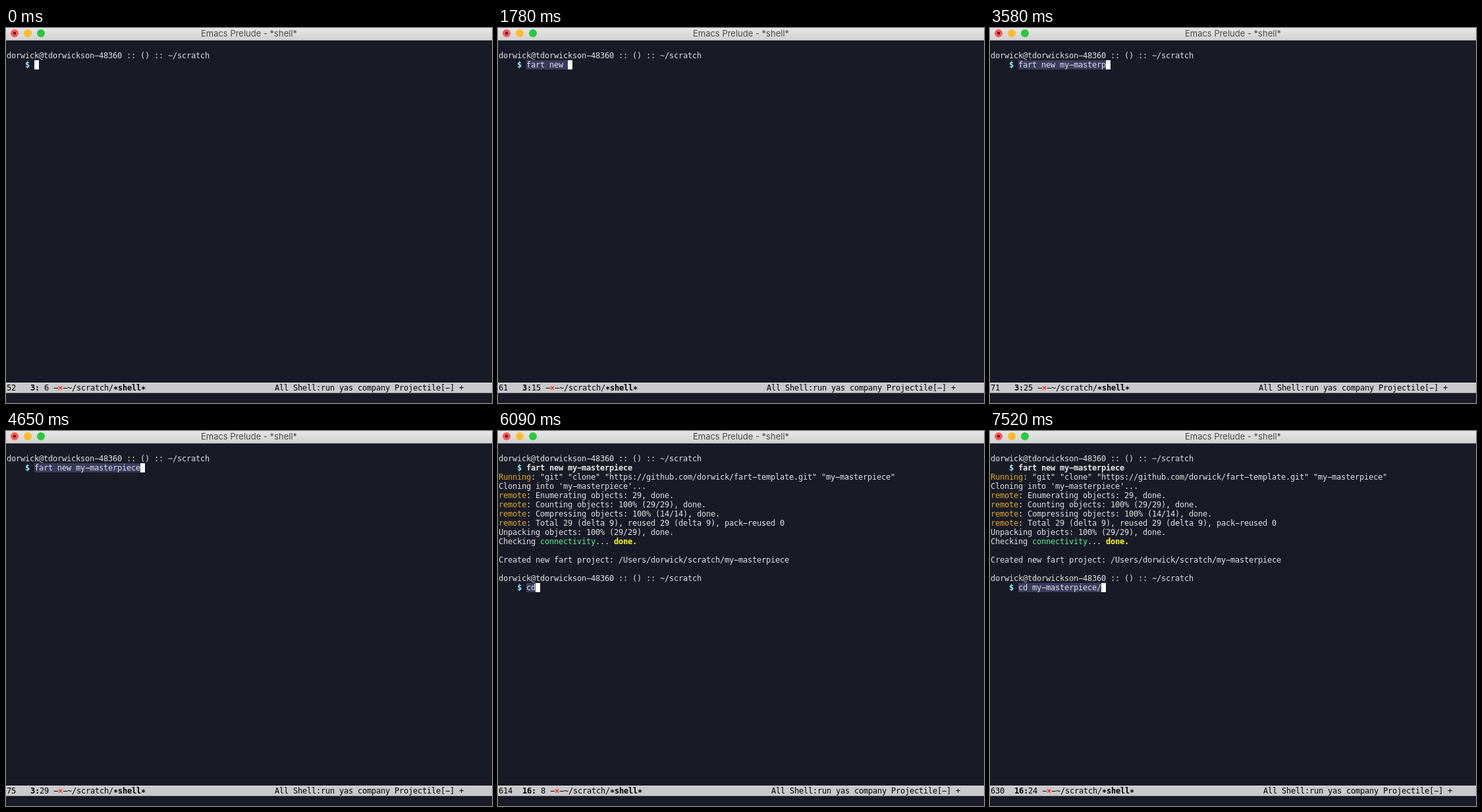
An HTML page with a canvas for the animation above (8000 ms loop, 738 by 570 pixels).

```html
<!DOCTYPE html>
<html lang="en">
<head>
<meta charset="utf-8">
<title>Shell session</title>
<style>
  html, body { margin: 0; width: 100%; height: 100%; overflow: hidden; background: #181a26; }
  canvas { display: block; }
</style>
</head>
<body>
<canvas id="stage" width="738" height="570"></canvas>
<script>
const ctx = document.getElementById('stage').getContext('2d');
const LOOP = 8000, CELL = 7, ROW = 14, LEFT = 1, TOP = 21;
const MONO = '12px "DejaVu Sans Mono", monospace';

// Markup: "<x>" switches to style x; [colour, bold, background]
const STYLES = {
  w: ['#e2e2e0'],
  b: ['#e8e8e6', true],
  h: ['#e2e2e0', false, '#3a3b5c'],
  p: ['#93f0fc', true],
  c: ['#a2f2fc'],
  o: ['#e2ab22'],
  g: ['#57f09a'],
  y: ['#ffff1a', true],
  k: ['#000'],
  K: ['#000', true],
  r: ['#ff2a12', true],
};
// Wide hyphens and centred asterisks
const GLYPHS = { '-': '\u2212', '*': '\u2217' };

const HOST = 'dorwick@tdorwickson-48360 :: () :: ~/scratch';
const PROMPT = '<p>    $ ';
const NEW = 'fart new my-masterpiece';
const CD = 'cd my-masterpiece/';
const PAD = ' '.repeat(8);

const remote = text => '<o>remote<w>: ' + text + PAD;
const START = [
  '<o>Running<w>: "git" "clone" "https://github.com/dorwick/fart-template.git" "my-masterpiece"',
  "Cloning into 'my-masterpiece'...",
];
const FETCH = [
  remote('Enumerating objects: 29, done.'),
  remote('Counting objects: 100% (29/29), done.'),
  remote('Compressing objects: 100% (14/14), done.'),
  remote('Total 29 (delta 9), reused 29 (delta 9), pack-reused 0'),
];
const FINISH = [
  'Unpacking objects: 100% (29/29), done.',
  'Checking <g>connectivity<w>... <y>done.',
  '',
  'Created new fart project: /Users/dorwick/scratch/my-masterpiece',
  '',
  HOST,
];

// One time per keystroke
const NEW_KEYS = [480, 960, 1080, 1190, 1300, 1540, 1660, 1780, 1780, 1900, 2020, 2260,
  2620, 2740, 2860, 2980, 3100, 3220, 3580, 4060, 4300, 4530, 4650];
const CD_KEYS = [6090, 6090, 6330, 6450, 6690, 6930, 7160, 7280, 7400];
const ENTER = 4890, CLONE = 5010, UNPACK = 5130, DONE = 5250, COMPLETE = 7520;

const typed = (text, keys, t) => text.slice(0, keys.filter(k => k <= t).length);
const plain = line => line.replace(/<\w>/g, '');

function screen(t) {
  const head = ['', HOST];
  if (t < ENTER) return [...head, PROMPT + '<h>' + typed(NEW, NEW_KEYS, t)];
  head.push(PROMPT + '<b>' + NEW);
  if (t < CLONE) return [...head, ''];
  if (t < UNPACK) return [...head, ...START, ''];
  if (t < DONE) return [...head, ...START, ...FETCH, '<c>Unpacking obj'];
  const cd = t < COMPLETE ? typed(CD, CD_KEYS, t) : CD;
  return [...head, ...START, ...FETCH, ...FINISH, PROMPT + '<h>' + cd];
}

function rect(color, x, y, w, h) {
  ctx.fillStyle = color;
  ctx.fillRect(x, y, w, h);
}

function disc(color, x, y, r) {
  ctx.fillStyle = color;
  ctx.beginPath();
  ctx.arc(x, y, r, 0, 2 * Math.PI);
  ctx.fill();
}

// Draws a marked-up line on the character grid; y is the top of the row
function write(line, x, y) {
  ('<w>' + line).split(/<(\w)>/).slice(1).forEach((part, i, parts) => {
    if (i % 2 === 0) return;
    const [color, bold, back] = STYLES[parts[i - 1]];
    if (back) rect(back, x, y, part.length * CELL, ROW);
    ctx.fillStyle = color;
    ctx.font = (bold ? 'bold ' : '') + MONO;
    for (const ch of part) {
      ctx.fillText(GLYPHS[ch] || ch, x, y + 11);
      x += CELL;
    }
  });
}

function titleBar() {
  const shade = ctx.createLinearGradient(0, 0, 0, 18);
  shade.addColorStop(0, '#e8e7e8');
  shade.addColorStop(1, '#d2d1d2');
  rect(shade, 0, 0, 738, 18);
  rect('#b4b3b5', 0, 18, 738, 1);
  ['#fc5753', '#fdbc2e', '#28c840'].forEach((color, i) => disc(color, 13 + 20 * i, 8, 6));
  disc('#4a0402', 13, 8, 2);
  ctx.fillStyle = '#4b4a4b';
  ctx.font = '13px Inter, sans-serif';
  ctx.textAlign = 'center';
  ctx.fillText('Emacs Prelude - *shell*', 369, 13);
  ctx.textAlign = 'left';
}

function modeLine(point, row, col) {
  rect('#c9c8ca', 0, 539, 738, 16);
  rect('#dddcde', 0, 539, 738, 1);
  rect('#a3a2a5', 0, 554, 738, 1);
  write('<k>' + point, LEFT, 540);
  write(`<K>${row}:<k>${String(col).padStart(2)} -<r>×<k>-~/scratch/<K>*shell*<k>`
    + ' '.repeat(28) + 'All Shell:run yas company Projectile[-] +', 37, 540);
}

function draw(t) {
  rect('#181a26', 0, 0, 738, 570);
  titleBar();
  const lines = screen(t);
  lines.forEach((line, i) => write(line, LEFT, TOP + ROW * i));
  const text = lines.map(plain);
  const col = text[text.length - 1].length;
  rect('#fff', LEFT + CELL * col, TOP + ROW * (lines.length - 1), CELL, ROW);
  modeLine(text.join('\n').length, lines.length, col);
}

function tick() {
  draw(performance.now() % LOOP);
  requestAnimationFrame(tick);
}
tick();
</script>
</body>
</html>
```
